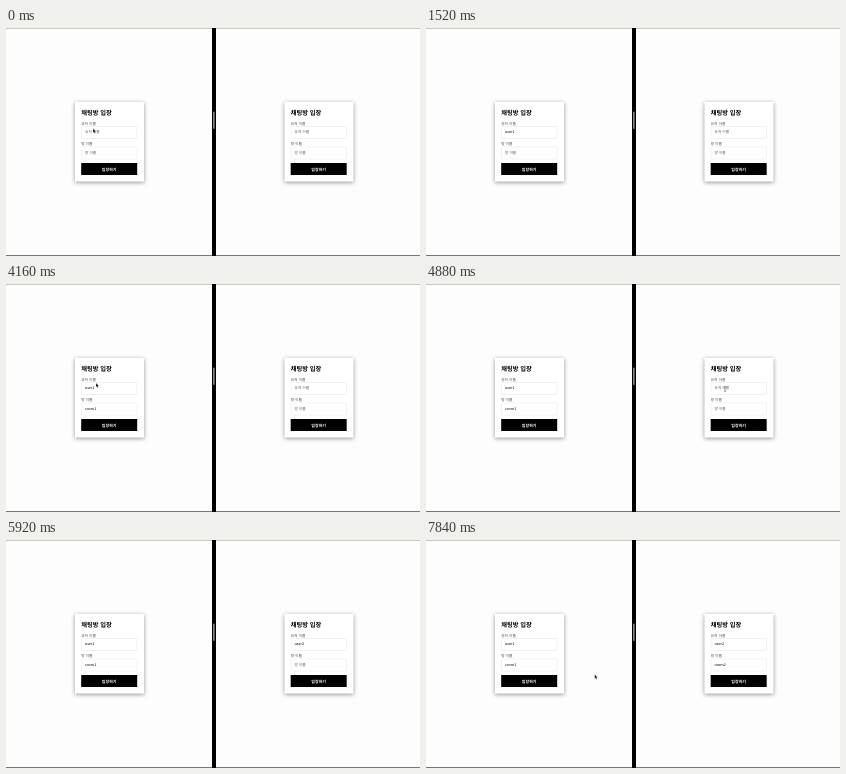
An HTML page that plays this animation: 414 by 228 pixels, repeating every 8 s.

```html
<!DOCTYPE html>
<html lang="ko">
<head>
<meta charset="utf-8">
<title>채팅방 입장</title>
<style>
  html, body { margin: 0; width: 100%; height: 100%; overflow: hidden; background: #fdfdfd; }
  svg { display: block; width: 100%; height: 100%; }
  text { font-family: "Noto Sans CJK KR", "Noto Sans CJK", "Noto Sans", sans-serif; font-size: 3.7px; fill: #111; text-rendering: geometricPrecision; }
  .card { fill: #fff; filter: drop-shadow(0 1px 2.2px rgba(0, 0, 0, .42)); }
  .title { font-size: 6.25px; font-weight: 700; fill: #000; }
  .label { fill: #444; }
  .input { fill: #fff; stroke: #e4e4e4; stroke-width: .5; }
  .value { font-weight: 500; fill: #000; }
  .value.empty { font-weight: 400; fill: #555; }
  .action { font-size: 4px; font-weight: 700; fill: #fff; text-anchor: middle; }
  .menu { fill: #fff; stroke: #ddd; stroke-width: .3; filter: drop-shadow(0 .5px 1px rgba(0, 0, 0, .3)); }
  .hint { fill: #aaa; }
</style>
</head>
<body>
<svg id="stage" viewBox="0 0 414 228">
  <rect width="414" height="228" fill="#fdfdfd"/>
  <rect width="414" height="1" fill="#c8c8c8"/>
  <rect y="227" width="414" height="1" fill="#777"/>
  <rect x="206" width="4" height="228" fill="#000"/>
  <rect x="207" y="83.5" width="1.6" height="17.5" rx=".8" fill="#8c8c8c"/>
</svg>
<script>
const LOOP = 8000, STEP = 80;
const stage = document.getElementById('stage');

function add(parent, tag, attrs, text) {
  const node = document.createElementNS('http://www.w3.org/2000/svg', tag);
  for (const key in attrs) node.setAttribute(key, attrs[key]);
  if (text) node.textContent = text;
  parent.append(node);
  return node;
}

function field(panel, y, name) {
  add(panel, 'text', { x: 6.2, y: y - 1.3, class: 'label' }, name);
  add(panel, 'rect', { x: 6.5, y: y + .5, width: 55.5, height: 12, rx: .6, class: 'input' });
  return { name, node: add(panel, 'text', { x: 10, y: y + 7.4, class: 'value' }) };
}

function menu(panel, y, height, rows) {
  const group = add(panel, 'g', {});
  add(group, 'rect', { x: 28.5, y, width: 43, height, rx: 1, class: 'menu' });
  for (const [label, rowY, kind] of rows)
    add(group, 'text', { x: 32, y: rowY, class: kind || 'value' }, label);
  return group;
}

function makePanel(x) {
  const panel = add(stage, 'g', { transform: `translate(${x} 74)` });
  add(panel, 'rect', { width: 69, height: 79.5, class: 'card' });
  add(panel, 'text', { x: 6.2, y: 12.8, class: 'title' }, '채팅방 입장');
  const user = field(panel, 24, '유저 이름');
  const room = field(panel, 44.5, '방 이름');
  add(panel, 'rect', { x: 6.2, y: 61, width: 56, height: 12, fill: '#000' });
  add(panel, 'text', { x: 34.2, y: 68.5, class: 'action' }, '입장하기');
  return {
    user, room,
    userMenu: menu(panel, 39, 31.5, [['user', 46, 'hint'], ['user1', 55.7], ['user2', 65.5]]),
    roomMenu: menu(panel, 59, 12, [['room1', 66.3]])
  };
}

const left = makePanel(69), right = makePanel(278.5);

// Each entry: field, menu, time of every keystroke, text, menu closing time.
const typing = [
  [left.user, left.userMenu, [800, 880, 960, 1040, 1520], 'user1', 1520],
  [left.room, left.roomMenu, [3280, 3360, 3440, 3520, 4000], 'room1', 4000],
  [right.user, right.userMenu, [5440, 5520, 5600, 5680, 5840], 'user2', 5920],
  [right.room, right.roomMenu, [6480, 6560, 6720, 6800, 6960], 'room2', 7040]
];

// Pointer strokes: visible span, shape, then [time, x, y] points.
const strokes = [
  [0, 80, 'arrow', [[0, 87, 100.5]]],
  [80, 800, 'beam', [[80, 88, 102], [320, 90, 104]]],
  [4160, 4880, 'arrow', [[4160, 90, 99], [4320, 112, 97], [4720, 275, 103], [4880, 298.5, 104.5]]],
  [4880, 5440, 'beam', [[4880, 299, 105], [5040, 300, 105]]],
  [7200, LOOP, 'arrow', [[7200, 297, 106], [7360, 232, 120], [7600, 124, 137], [7680, 124, 137], [7760, 150, 137], [7840, 168.7, 134.5]]]
];

const shapes = {
  arrow: add(stage, 'path', { d: 'M0 0V4.2L1 3.4 1.7 4.9 2.4 4.6 1.7 3.1H3Z', fill: '#000', stroke: '#fff', 'stroke-width': .3 }),
  beam: add(stage, 'path', { d: 'M-.8-2.3H.8M0-2.3V2.3M-.8 2.3H.8', fill: 'none', stroke: '#333', 'stroke-width': .5 })
};

function along(points, t) {
  let i = 0;
  while (i < points.length - 1 && points[i + 1][0] <= t) i++;
  const [t0, x0, y0] = points[i], [t1, x1, y1] = points[i + 1] || points[i];
  const k = t1 > t0 ? (t - t0) / (t1 - t0) : 0;
  return [x0 + (x1 - x0) * k, y0 + (y1 - y0) * k];
}

function show(node, visible) {
  node.style.display = visible ? '' : 'none';
}

function draw(t) {
  for (const [input, list, keys, text, close] of typing) {
    const count = keys.filter(key => key <= t).length;
    input.node.textContent = count ? text.slice(0, count) : input.name;
    input.node.classList.toggle('empty', !count);
    show(list, count > 0 && t < close);
  }
  const stroke = strokes.find(([from, to]) => t >= from && t < to);
  for (const kind in shapes) show(shapes[kind], stroke && stroke[2] === kind);
  if (stroke) {
    const [x, y] = along(stroke[3], t);
    shapes[stroke[2]].setAttribute('transform', `translate(${x} ${y})`);
  }
}

const start = performance.now();
function tick() {
  const t = (performance.now() - start) % LOOP;
  draw(Math.floor(t / STEP) * STEP);
  requestAnimationFrame(tick);
}
tick();
</script>
</body>
</html>
```
